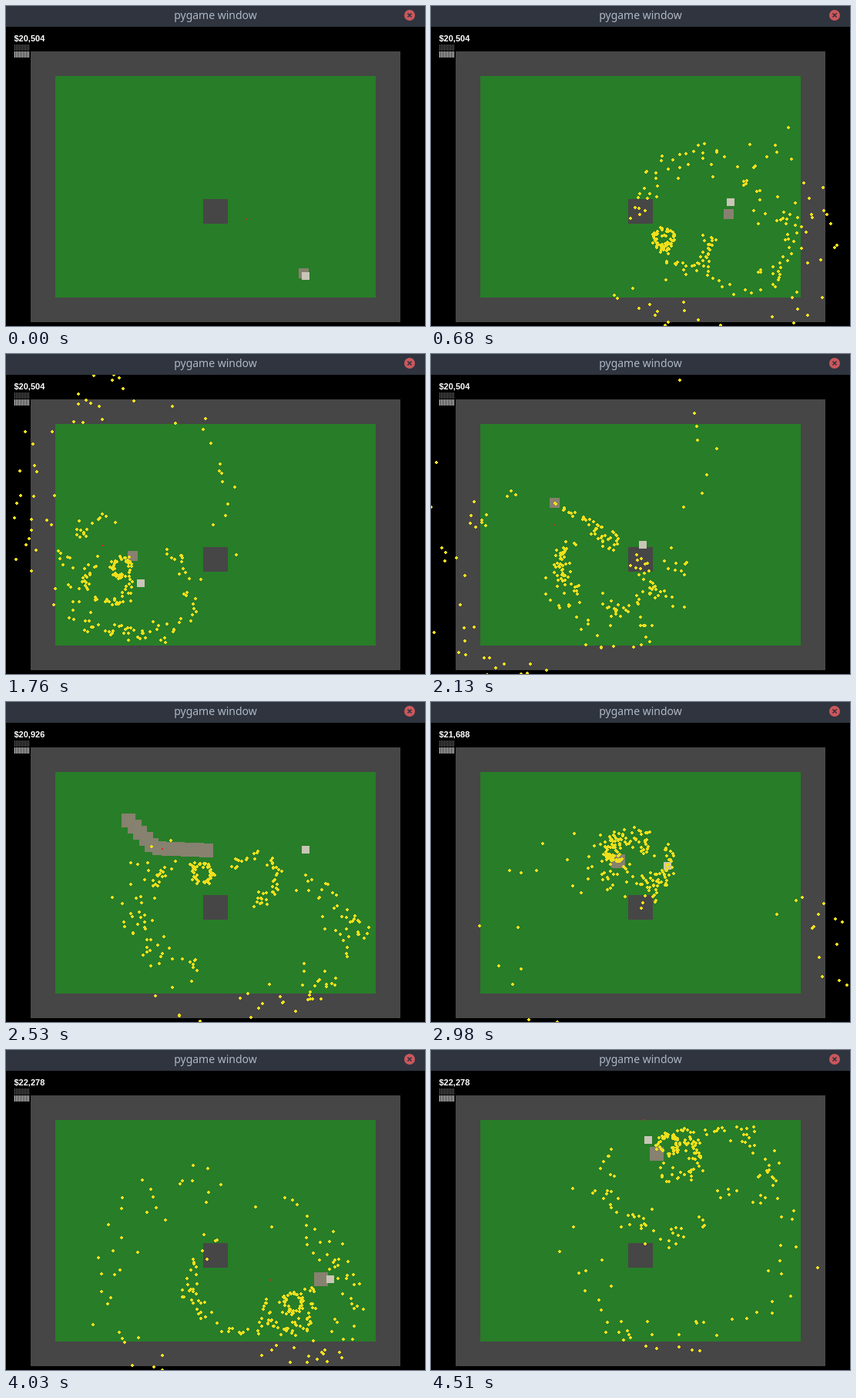
An HTML page that plays this animation: 544 px wide and 416 px high, repeating every 4.61 s.

```html
<!DOCTYPE html>
<html lang="en">
<head>
<meta charset="utf-8">
<title>pygame window</title>
<style>
  html, body { margin: 0; width: 100%; height: 100%; overflow: hidden; background: #000; }
  svg { display: block; width: 544px; height: 416px; }
</style>
</head>
<body>
<svg viewBox="0 0 544 416" shape-rendering="crispEdges">
  <rect x="32" y="59" width="480" height="352" fill="#464646"/>
  <rect x="64" y="91" width="416" height="288" fill="#287d28"/>
  <rect x="256" y="251" width="32" height="32" fill="#464646"/>
  <path id="player" fill="#87816f"/>
  <path id="block" fill="#c9c5b7"/>
  <path id="aim" fill="#c8321e"/>
  <text id="score" x="10.5" y="46" fill="#fff" font-family="'Liberation Sans', sans-serif" font-weight="700" font-size="11"></text>
  <path id="dim" fill="#5a5a5a"/>
  <path id="lit" fill="#f0f0f0"/>
  <path id="shots" fill="#f0df1c"/>
  <rect width="544" height="27" fill="#2f343f"/>
  <text x="272" y="17" text-anchor="middle" fill="#afb8c5" font-family="'Noto Sans', sans-serif" font-size="14">pygame window</text>
  <g shape-rendering="auto">
    <circle cx="524" cy="12" r="7" fill="#cc575d"/>
    <path d="M521.5 9.5l5 5m0-5l-5 5" stroke="#2f343f" stroke-width="1.7"/>
  </g>
</svg>
<script>
const LOOP = 4610, LAST = 4510, PER_ARC = 48;
const DASH = 2330, DASH_END = 2530;
const KEYS = [0, 680, 1760, DASH_END, 3390, 4030, LAST];

const blockAt = [[389, 351], [389, 255], [175, 298], [389, 192], [228, 234], [421, 298], [282, 117]];
const aimAt = [[313, 277], [270, 272], [125, 249], [203, 191], [229, 175], [343, 299], [276, 91]];
const playerAt = [[386, 347], [386, 270], [164, 262], [260, 193], [226, 221], [409, 298], [293, 135]];
const dashFrom = [159, 154], dashTurn = [193, 190];

// Swarm shape at each key: arcs from inside to outside as cx, cy, middle angle
const RADIUS = [12, 30, 61, 75, 138];
const SPAN = [360, 240, 195, 195, 235];
const SPREAD = [4, 9, 15, 18, 32];
const swarmAt = [
  null,
  [[302, 302, 0], [333, 309, 85], [410, 302, 55], [345, 270, 272], [380, 296, 50]],
  [[150, 277, 0], [135, 295, 125], [180, 305, 35], [145, 285, 165], [165, 190, 265]],
  [[255, 222, 0], [322, 228, -30], [235, 275, 175], [378, 310, 20], [300, 265, 105]],
  [[254, 208, 0], [215, 185, 220], [310, 180, 75], [205, 185, 200], [265, 182, 320]],
  [[372, 328, 0], [370, 332, 70], [300, 305, 145], [375, 325, 25], [272, 302, 220]],
  [[308, 122, 0], [318, 135, 30], [378, 164, -55], [308, 165, 107], [330, 252, 90]]
];

const el = id => document.getElementById(id);
const draw = (id, d) => el(id).setAttribute("d", d);
const mix = (a, b, p) => a + (b - a) * p;
const mixPoint = (a, b, p) => [mix(a[0], b[0], p), mix(a[1], b[1], p)];
const rnd = n => { const v = Math.sin(n * 12.9898 + 4.1) * 43758.5453; return v - Math.floor(v); };
const part = (t, a, b) => Math.max(0, Math.min(1, (t - a) / (b - a)));

function segment(t) {
  let k = 0;
  while (k < KEYS.length - 2 && KEYS[k + 1] <= t) k++;
  return [k, part(t, KEYS[k], KEYS[k + 1])];
}

function along(points, t) {
  const [k, p] = segment(t);
  return mixPoint(points[k], points[k + 1], p);
}

function playerPos(t) {
  const turn = mix(DASH, DASH_END, 0.45);
  if (t < KEYS[2] || t >= DASH_END) return along(playerAt, t);
  if (t < DASH) return mixPoint(playerAt[2], dashFrom, part(t, KEYS[2], DASH));
  if (t < turn) return mixPoint(dashFrom, dashTurn, part(t, DASH, turn));
  return mixPoint(dashTurn, playerAt[3], part(t, turn, DASH_END));
}

function square([x, y], size) {
  return `M${Math.round(x - size / 2)} ${Math.round(y - size / 2)}h${size}v${size}h${-size}z`;
}

// A shot keeps its seed while it moves two arcs outward per key
const seed = (k, j, i) => (j - 2 * k) * 97.3 + i * 3.7;

function spot(k, j, i) {
  const [cx, cy, mid] = swarmAt[k][j], s = seed(k, j, i);
  const a = (mid + (rnd(s) - 0.5) * SPAN[j]) * Math.PI / 180;
  const off = n => (rnd(s + n) + rnd(s + n + 1) + rnd(s + n + 2) - 1.5) * SPREAD[j];
  return [cx + RADIUS[j] * Math.cos(a) + off(500), cy + RADIUS[j] * Math.sin(a) + off(800)];
}

function swarm(t) {
  const [k, p] = segment(t);
  const left = t < 600 ? 257 : t < 1160 ? 124 : -4;
  const top = t < 1160 ? 107 : 22;
  let d = "";

  const put = (a, b, q) => {
    const [x, y] = mixPoint(a, b, q).map(Math.round);
    if (x < left || y < top || x > 546 || y > 418) return;
    d += `M${x - 1} ${y - 2}h2v1h1v2h-1v1h-2v-1h-1v-2h1z`;
  };

  for (let j = 0; j < 5; j++) for (let i = 0; i < PER_ARC; i++) {
    const end = spot(k + 1, j, i), u = rnd(seed(k + 1, j, i) + 77);
    if (k && j > 1) {
      put(spot(k, j - 2, i), end, p);
    } else {
      const start = k ? 0.45 - 0.4 * j + 0.5 * u : 0.75 - 0.17 * j + 0.2 * u;
      if (p > start) put(playerPos(mix(KEYS[k], KEYS[k + 1], start)), end, part(p, start, 1));
    }
    if (k && j > 2 && p < 0.3 + 0.65 * rnd(seed(k, j, i) + 31)) {
      const a = spot(k, j, i);
      put(a, mixPoint(playerAt[k], a, 2.2), p);
    }
  }
  return d;
}

function render(now) {
  const time = now % LOOP;
  const lag = time < 2210 ? 0 : time < 3310 ? 10 : 30;
  const t = Math.min(LAST, Math.floor((time - lag) / 40) * 40 + lag);

  let body = square(playerPos(t), t < 2250 ? 13 : 18);
  if (t >= DASH && t < 2610)
    for (let s = DASH; s <= Math.min(t, DASH_END); s += 20) body += square(playerPos(s), 18);
  draw("player", body);
  draw("block", square(along(blockAt, t), 10));
  draw("aim", square(along(aimAt, t), 2));
  draw("shots", swarm(t));

  const cash = 20504 + 2 * Math.round(211 * part(t, 2250, DASH_END) + 676 * part(t, DASH_END, 3310));
  el("score").textContent = "$" + cash.toLocaleString("en-US");
}

const bars = y => Array.from({ length: 10 }, (_, i) => `M${11 + i * 2} ${y}h1v8h-1z`).join("");
draw("dim", bars(50));
draw("lit", bars(59));

const begin = performance.now();
function tick() {
  render(performance.now() - begin);
  requestAnimationFrame(tick);
}
tick();
</script>
</body>
</html>
```
